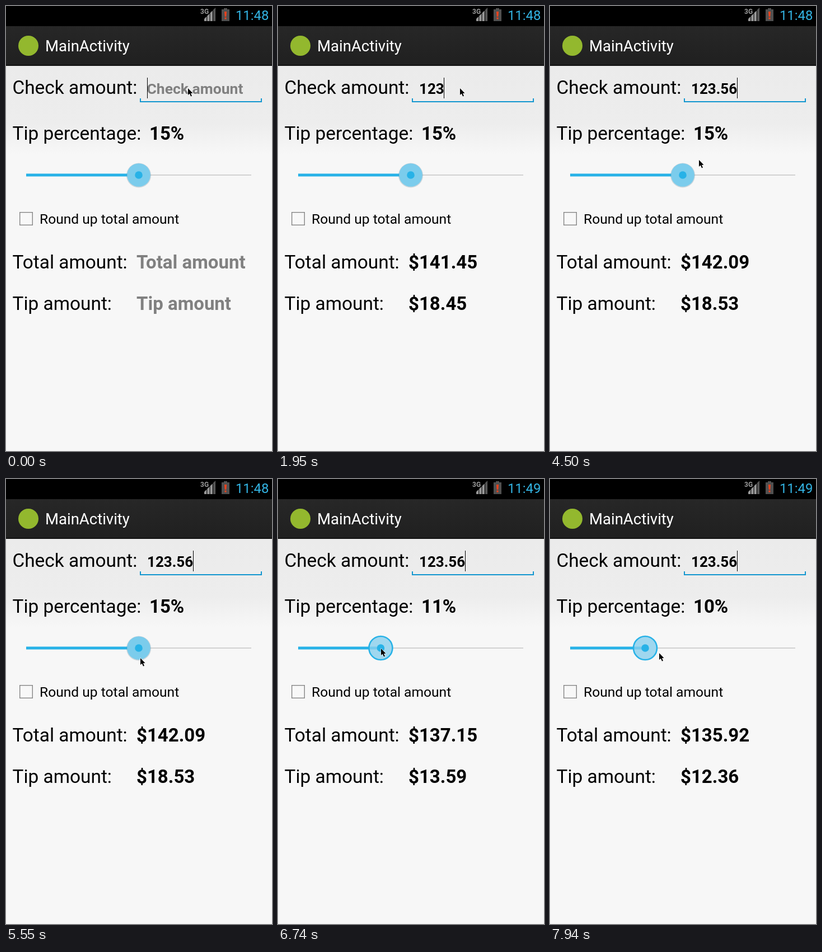
Write an HTML page with a canvas that moves like this. It is 475 px wide and 795 px high and loops after 8 s.

```html
<!DOCTYPE html>
<html lang="en">
<head>
<meta charset="utf-8">
<title>Tip calculator</title>
<style>
html, body { margin: 0; width: 100%; height: 100%; overflow: hidden; background: #f7f7f7; }
canvas { display: block; }
</style>
</head>
<body>
<canvas id="stage" width="475" height="795"></canvas>
<script>
const ctx = document.getElementById('stage').getContext('2d');
const LOOP = 8000;
const BLUE = '#27b2e7';

// Each track holds its value until the next entry: [time, value].
const typed = [[0, ''], [150, '1'], [1050, '12'], [1950, '123'],
  [3450, '123.'], [4200, '123.5'], [4500, '123.56']];
const caretOn = [[0, true], [2400, false], [3450, true], [3900, false], [4200, true],
  [5100, false], [5550, true], [6000, false], [6590, true], [7040, false], [7640, true]];
const percents = [[0, 15], [6290, 14], [6440, 13], [6590, 12], [6740, 11],
  [6890, 9], [7040, 8], [7190, 7], [7340, 6], [7640, 7], [7790, 9], [7940, 10]];
const clock = [[0, '11:48'], [6740, '11:49']];

// Pointer moves in even steps: start, step length, count, from, to.
const moves = [
  [2400, 150, 5, [325, 147], [266, 275]],
  [5100, 150, 3, [266, 275], [246, 337]],
  [5550, 150, 2, [246, 337], [234, 303]],
  [6440, 150, 6, [234, 303], [134, 302]],
  [7340, 300, 1, [134, 302], [118, 303]],
  [7640, 150, 3, [118, 303], [195, 311]]
];

function valueAt(track, t) {
  let value = track[0][1];
  for (const [time, next] of track) if (t >= time) value = next;
  return value;
}

function pointerAt(t) {
  let pos = moves[0][3];
  for (const [start, length, count, from, to] of moves) {
    if (t < start) break;
    const k = Math.min(count, Math.floor((t - start) / length) + 1) / count;
    pos = from.map((v, i) => Math.round(v + (to[i] - v) * k));
  }
  return pos;
}

function rect(x, y, w, h, color) {
  ctx.fillStyle = color;
  ctx.fillRect(x, y, w, h);
}

function disc(x, y, r, color) {
  ctx.fillStyle = color;
  ctx.beginPath();
  ctx.arc(x, y, r, 0, Math.PI * 2);
  ctx.fill();
}

function shape(points, color) {
  ctx.fillStyle = color;
  ctx.beginPath();
  points.forEach(([x, y]) => ctx.lineTo(x, y));
  ctx.closePath();
  ctx.fill();
}

function text(str, x, y, size, color = '#000', weight = 400) {
  ctx.font = `${weight} ${size}px Roboto, sans-serif`;
  ctx.fillStyle = color;
  ctx.fillText(str, x, y);
}

const bold = (str, x, y, size = 33, color = '#000') => text(str, x, y, size, color, 700);

// Exact halves round down, as in the currency display.
const money = v => '$' + (Math.round(v * 100 - 1e-6) / 100).toFixed(2);

function drawBackground() {
  const g = ctx.createLinearGradient(0, 107, 0, 265);
  g.addColorStop(0, '#ebebeb');
  g.addColorStop(0.65, '#ededed');
  g.addColorStop(1, '#f7f7f7');
  rect(0, 0, 475, 795, '#f7f7f7');
  rect(0, 107, 475, 158, g);
}

function drawBars(t) {
  rect(0, 0, 475, 36, '#000');
  text('3G', 347, 14, 12, '#9a9a9a', 700);
  for (let i = 0; i < 4; i++) {
    const x = 354 + i * 5.3;
    const top = 23 - i * 5.3;
    shape([[x, 27], [x, top], [x + 4.2, top - 4.2], [x + 4.2, 27]], i < 3 ? '#999' : '#555');
  }
  rect(389, 4, 6, 3, '#555');
  rect(385, 6, 14, 21, '#505050');
  shape([[390, 10], [394, 10], [393.3, 19], [390.7, 19]], '#f0421c');
  rect(390.5, 20.5, 3, 3, '#f0421c');
  text(valueAt(clock, t), 410, 25, 23.8, '#33b5e5');

  const g = ctx.createLinearGradient(0, 36, 0, 105);
  g.addColorStop(0, '#272727');
  g.addColorStop(1, '#202020');
  rect(0, 36, 475, 69, g);
  rect(0, 105, 475, 2, '#111');
  disc(40, 71, 18, '#93b82e');
  text('MainActivity', 70, 81, 27.5, '#fff');
}

function drawInput(t) {
  const value = valueAt(typed, t);
  if (value) bold(value, 252, 157, 26);
  else bold('Check amount', 251.5, 157, 26.5, '#808080');
  rect(239, 170, 218, 2, '#1296cf');
  rect(239, 165, 2, 6, '#1296cf');
  rect(455, 165, 2, 6, '#1296cf');
  if (valueAt(caretOn, t)) {
    const x = Math.floor(252 + (value ? ctx.measureText(value).width : 0));
    rect(x, 128, 1, 37, '#000');
  }
}

function drawSlider(percent, pressed) {
  const x = 36 + percent * 13.4;
  const y = 302;
  rect(36, 301, 402, 2, '#d2d2d2');
  rect(36, 299.5, x - 36, 5, BLUE);
  if (pressed) {
    disc(x, y, 21, '#9fd7ef');
    ctx.globalAlpha = 0.35;
    rect(x - 20, 299.5, 20, 5, BLUE);
    ctx.globalAlpha = 1;
    ctx.strokeStyle = BLUE;
    ctx.lineWidth = 2.6;
    ctx.beginPath();
    ctx.arc(x, y, 21, 0, Math.PI * 2);
    ctx.stroke();
  } else {
    disc(x, y + 0.5, 22, 'rgba(90, 130, 150, 0.28)');
    disc(x, y, 20.8, '#7bccec');
  }
  disc(x, y, 6.8, BLUE);
}

function drawCheckbox() {
  rect(24, 368, 24, 24, '#858585');
  rect(25.4, 369.4, 21.2, 21.2, '#f8f8f8');
  text('Round up total amount', 60, 389, 24.6);
}

function drawPointer([x, y]) {
  ctx.save();
  ctx.translate(x, y);
  ctx.lineJoin = 'round';
  ctx.strokeStyle = 'rgba(255, 255, 255, 0.75)';
  ctx.lineWidth = 1.4;
  ctx.beginPath();
  [[0, 0], [0, 12], [2.8, 9.6], [5, 14.6], [7, 13.7], [4.9, 8.9], [8.5, 8.7]]
    .forEach(([px, py]) => ctx.lineTo(px, py));
  ctx.closePath();
  ctx.stroke();
  ctx.fillStyle = '#000';
  ctx.fill();
  ctx.restore();
}

function draw(t) {
  const amount = valueAt(typed, t);
  const percent = valueAt(percents, t);
  const tip = amount * percent / 100;

  drawBackground();
  drawBars(t);
  text('Check amount:', 11.5, 157, 33.4);
  text('Tip percentage:', 11.5, 239, 33.4);
  text('Total amount:', 11.5, 469, 33.4);
  text('Tip amount:', 11.5, 543, 33.4);
  drawInput(t);
  bold(percent + '%', 256, 239);
  drawSlider(percent, t >= 6290);
  drawCheckbox();
  if (amount) {
    bold(money(Number(amount) + tip), 233, 469);
    bold(money(tip), 233, 543);
  } else {
    bold('Total amount', 233, 469, 33, '#808080');
    bold('Tip amount', 233, 543, 33, '#808080');
  }
  drawPointer(pointerAt(t));
}

let start;
function tick(now) {
  start ??= now;
  draw((now - start) % LOOP);
  requestAnimationFrame(tick);
}
draw(0);
requestAnimationFrame(tick);
</script>
</body>
</html>
```
